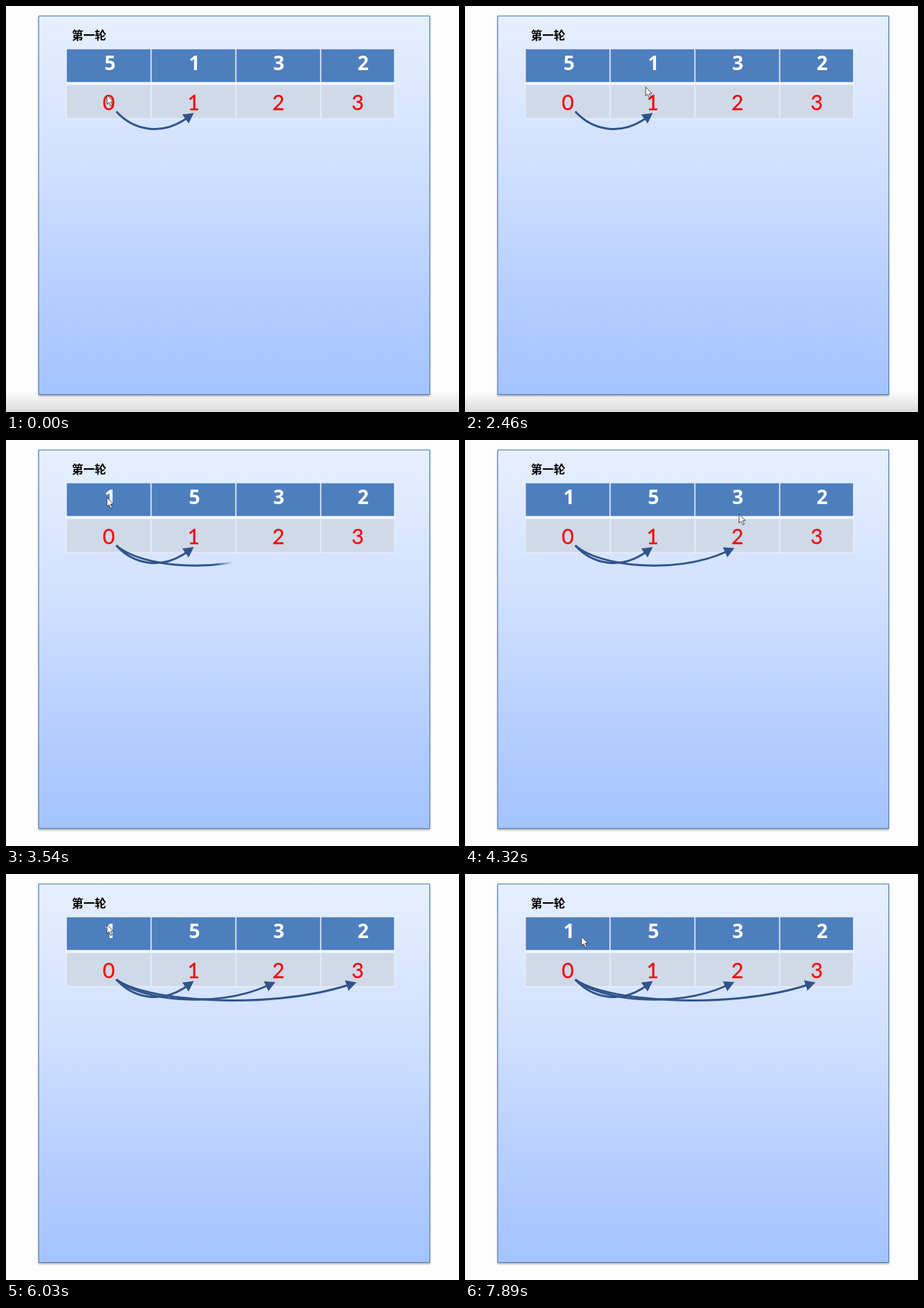
An HTML page that plays this animation: 657 px wide and 589 px high, repeating every 8000 ms.

```html
<!DOCTYPE html>
<html lang="zh">
<head>
<meta charset="utf-8">
<style>
html, body { margin: 0; width: 100%; height: 100%; overflow: hidden; background: #fdfdfd; }
svg { display: block; width: 657px; height: 589px; }
text { text-anchor: middle; }
.title { font: bold 16.7px "Noto Sans CJK SC", "Noto Sans CJK", sans-serif; text-anchor: start; }
.value { font: bold 28.5px "Noto Sans", "Open Sans", sans-serif; fill: #fff; }
.index { font: 30.5px Lato, sans-serif; fill: #f5080c; stroke: #f5080c; stroke-width: .3px; }
</style>
</head>
<body>
<svg viewBox="0 0 657 589">
  <defs>
    <linearGradient id="sky" x2="0" y2="1">
      <stop offset="0" stop-color="#e6efff"/>
      <stop offset=".4" stop-color="#d0e0ff"/>
      <stop offset=".7" stop-color="#b8cfff"/>
      <stop offset="1" stop-color="#a4c3ff"/>
    </linearGradient>
    <linearGradient id="floor" x2="0" y2="1">
      <stop offset="0" stop-color="#fbfbfb"/>
      <stop offset="1" stop-color="#dadada"/>
    </linearGradient>
    <linearGradient id="edge">
      <stop offset=".94" stop-color="#fff"/>
      <stop offset="1" stop-color="#fff" stop-opacity="0"/>
    </linearGradient>
    <filter id="shade" x="-5%" y="-5%" width="110%" height="110%">
      <feDropShadow dx="0" dy="1.5" stdDeviation="1.5" flood-color="#000" flood-opacity=".4"/>
    </filter>
    <marker id="head" markerUnits="userSpaceOnUse" markerWidth="16" markerHeight="18"
      refX="1" refY="9" orient="auto"><path d="M0 1L15 9L0 17Z" fill="#30548a"/></marker>
  </defs>
  <rect id="strip" y="561" width="657" height="28" fill="url(#floor)"/>
  <rect x="47.5" y="14.5" width="567" height="549" fill="url(#sky)" stroke="#4a7ebb" filter="url(#shade)"/>
  <text class="title" x="95.5" y="48.5">第一轮</text>
  <g id="table"></g>
  <g id="arrows" stroke="#30548a" fill="none" stroke-width="3"></g>
  <path id="cursor" d="M0 0V13L3 10.3L5.3 15.6L7.5 14.6L5.2 9.5H9.2Z" fill="#fff" stroke="#444"/>
</svg>
<script>
const LOOP = 8000, SWAP = 2820, STRIP_OFF = 3510;
const CLEAR = 420, WIPES = [1440, 3510, 4980], WIPE_MS = 200;
const GLIDE_MS = 450;
const $ = id => document.getElementById(id);

function add(parent, tag, attrs, text) {
  const el = document.createElementNS('http://www.w3.org/2000/svg', tag);
  for (const k in attrs) el.setAttribute(k, attrs[k]);
  if (text !== undefined) el.textContent = text;
  return parent.appendChild(el);
}

function addColumn(i) {
  const left = 87.5 + 123 * i, width = i < 3 ? 123 : 107;
  const cell = (y, height, fill) => add($('table'), 'rect',
    { x: left, y, width, height, fill, stroke: '#e9eef7', 'stroke-width': 1.5 });
  cell(62, 49, '#4d7fbf');
  cell(114, 49.5, '#d0d9e8');
  add($('table'), 'text', { class: 'index', x: left + width / 2, y: 151.3 }, i);
  return add($('table'), 'text', { class: 'value', x: 151 + 122.3 * i, y: 93 });
}
const values = [0, 1, 2, 3].map(addColumn);
add($('table'), 'path', { d: 'M87 112.5H564', stroke: '#f4f7fc', 'stroke-width': 3 });

// Each arrow reaches one column further and sags a little more
function addArrow(start, i) {
  const endX = 261 + 117 * i, endY = 163.5 - i;
  const bendX = 160 + (endX - 160) * .66, bendY = 200 - 12 / (1 + 2 * i);
  const mask = add($('arrows'), 'mask',
    { id: 'wipe' + i, maskUnits: 'userSpaceOnUse', x: 0, y: 0, width: 657, height: 589 });
  const cover = add(mask, 'rect', { y: 130, width: 420, height: 80, fill: 'url(#edge)', stroke: 'none' });
  const group = add($('arrows'), 'g', { mask: `url(#wipe${i})` });
  add(group, 'path', {
    d: `M160 153C${185 + 8 * i} ${181 + 2 * i} ${bendX} ${bendY} ${endX} ${endY}`,
    'marker-end': 'url(#head)'
  });
  return { start, cover, group, reach: endX + 40 };
}
const arrows = WIPES.map(addArrow);

// Pointer stops: [arrival time, x, y]
const stops = [
  [0, 146.5, 129.5], [810, 133, 167], [1170, 157, 152], [1380, 165, 149.5],
  [2460, 262, 117.5], [3330, 146.5, 83.5], [4290, 397.5, 107.5], [5250, 520, 112],
  [5790, 170, 77], [6030, 146.5, 73.5], [7890, 169, 91]
];

const clamp = v => Math.min(1, Math.max(0, v));
const smooth = u => u * u * (3 - 2 * u);
const expoOut = u => u < 1 ? 1 - 2 ** (-10 * u) : 1;

function pointerAt(t) {
  const next = stops.findIndex(s => s[0] > t);
  if (next < 0) return stops[stops.length - 1].slice(1);
  const [t0, x0, y0] = stops[next - 1], [t1, x1, y1] = stops[next];
  const ms = Math.min(GLIDE_MS, t1 - t0);
  const p = smooth(clamp((t - t1 + ms) / ms));
  return [x0 + (x1 - x0) * p, y0 + (y1 - y0) * p];
}

function draw() {
  const t = performance.now() % LOOP;
  $('cursor').setAttribute('transform', `translate(${pointerAt(t)})`);
  $('strip').style.display = t < STRIP_OFF ? '' : 'none';
  const row = t < SWAP ? '5132' : '1532';
  values.forEach((el, i) => { el.textContent = row[i]; });
  arrows.forEach(({ start, cover, group, reach }, i) => {
    const leftover = i === 0 && t < CLEAR;
    const p = leftover ? 1 : expoOut(clamp((t - start) / WIPE_MS));
    group.style.display = p ? '' : 'none';
    cover.setAttribute('x', 158 + p * (reach - 158) - 420);
  });
  requestAnimationFrame(draw);
}
draw();
</script>
</body>
</html>
```
